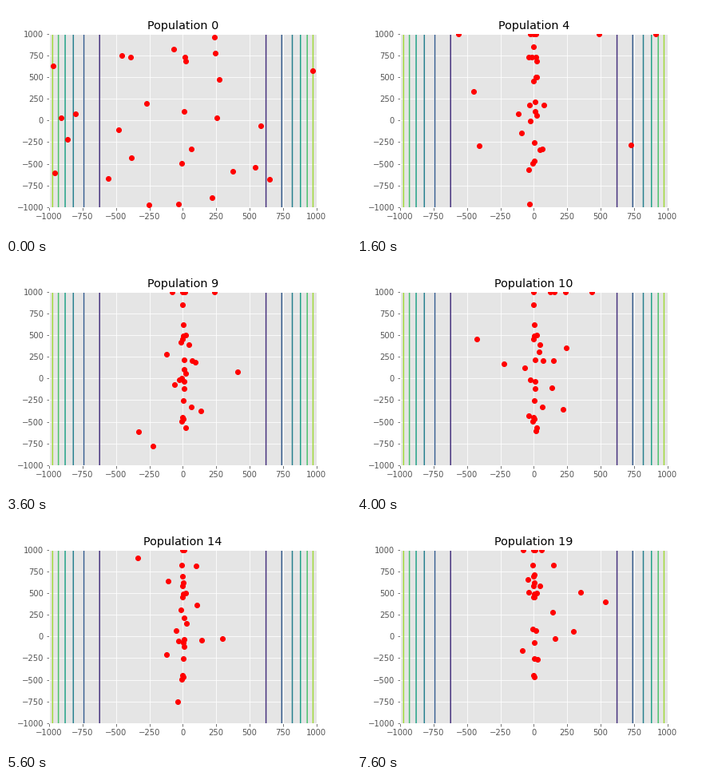
A matplotlib script that plays this animation: 432x288 px, repeating every 8000 ms.

```python
import matplotlib.pyplot as plt
import numpy as np
from matplotlib.animation import FuncAnimation

GENERATIONS = 20
INTERVAL = 400
LIMIT = 1000
DRIFTERS = 27
REPLACED = 13

# Long-lived individuals: x, y, first and last generation.
ELITE = [(66, -331, 0, 13), (-33, -963, 0, 5), (729, -283, 3, 8),
         (6, -255, 4, 19), (24, 497, 4, 19), (6, 619, 5, 19),
         (234, 1000, 6, 10)]


def offspring(generation, count, rng):
    """New individuals: a narrow core around x = 0 and shrinking outliers."""
    core = rng.random(count) < 0.25
    x = rng.normal(0, np.where(core, 35, 520 - 17 * generation))
    y = rng.normal(150 + 10 * generation, 600 - 10 * generation, count)
    y[rng.random(count) < 0.12] = LIMIT
    return np.column_stack([x, y]).clip(-LIMIT, LIMIT)


def evolve(seed):
    """Every generation replaces its weakest, mostly those far from x = 0."""
    rng = np.random.default_rng(seed)
    drifters = rng.uniform(-0.98 * LIMIT, 0.98 * LIMIT, (DRIFTERS, 2))
    history = []
    for generation in range(GENERATIONS):
        if generation:
            weakness = np.abs(drifters[:, 0]) * rng.random(DRIFTERS)
            weakest = np.argsort(weakness)[-REPLACED:]
            drifters[weakest] = offspring(generation, REPLACED, rng)
        elite = [(x, y) for x, y, first, last in ELITE
                 if first <= generation <= last]
        history.append(np.vstack([drifters, elite]))
    return history


plt.style.use("ggplot")
plt.rcParams["font.family"] = "DejaVu Sans"
fig = plt.figure(figsize=(6, 4), dpi=72, facecolor="white")
ax = fig.add_axes([0.125, 0.125, 0.775, 0.755])
ax.set(xlim=(-LIMIT, LIMIT), ylim=(-LIMIT, LIMIT))
ax.set_xticks(range(-LIMIT, LIMIT + 1, 250))
ax.set_yticks(range(-LIMIT, LIMIT + 1, 250))

# Level lines of x**4, evenly spaced in height.
for level in range(1, 7):
    x = LIMIT * (0.15 * level) ** 0.25
    for side in (-x, x):
        ax.axvline(side, color=plt.cm.viridis(level / 7), lw=1.5, snap=False)

populations = evolve(seed=7)
dots, = ax.plot([], [], "o", color="red", ms=6, zorder=3)
title = ax.set_title("Population 0", color="black")


def update(generation):
    dots.set_data(*populations[generation].T)
    title.set_text(f"Population {generation}")
    return dots, title


anim = FuncAnimation(fig, update, frames=GENERATIONS, interval=INTERVAL,
                     repeat=True, repeat_delay=0)
plt.show()
```
